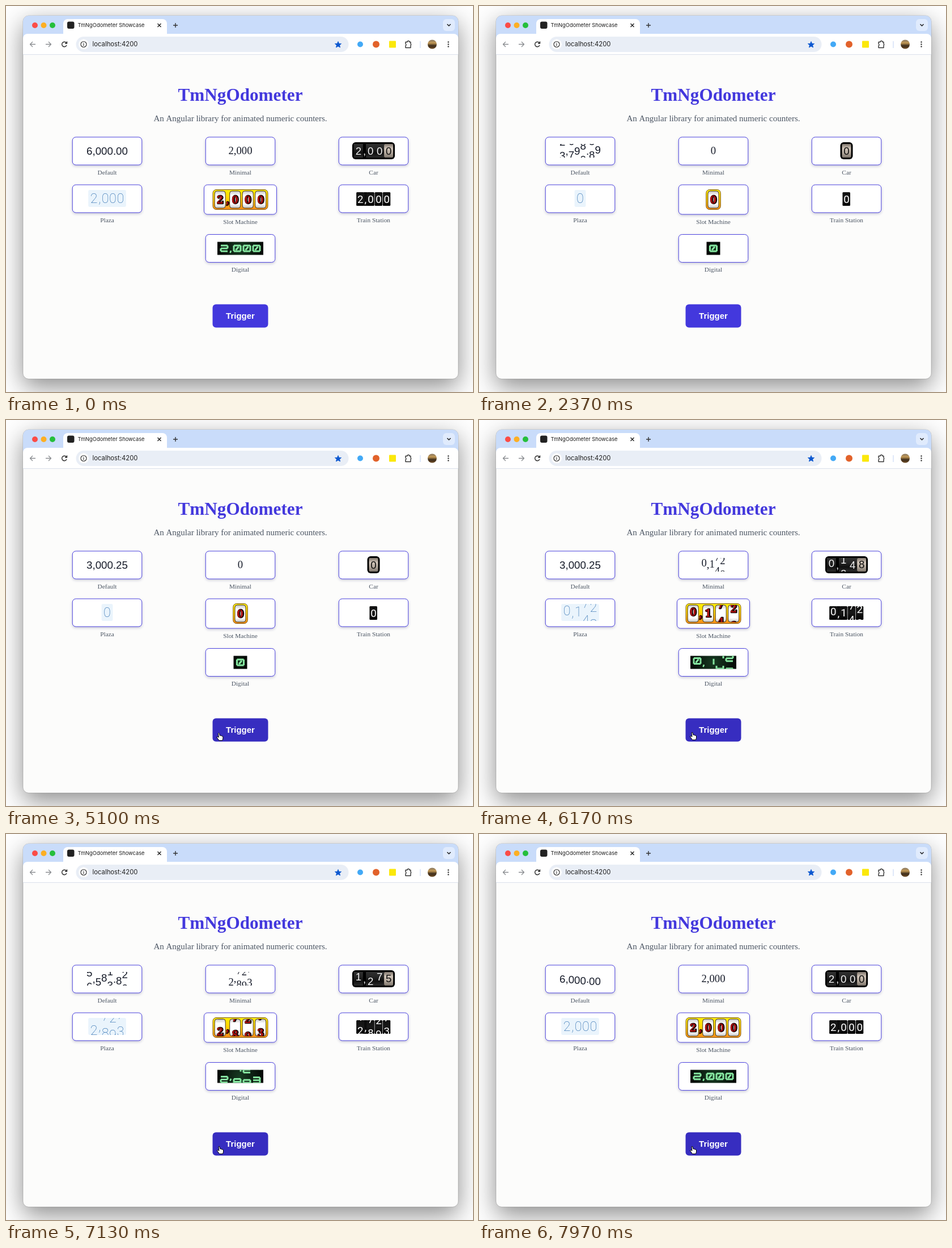
An HTML page with a canvas for the animation above (8000 ms loop, 824 px wide and 680 px high).

```html
<!DOCTYPE html>
<html lang="en">
<head>
<meta charset="utf-8">
<title>TmNgOdometer Showcase</title>
<style>
html, body { margin: 0; width: 100%; height: 100%; overflow: hidden; background: #fff; }
canvas { display: block; width: 824px; height: 680px; }
</style>
</head>
<body>
<canvas id="stage"></canvas>
<script>
const LOOP = 8000, SPIN = 2000, MAX_STEPS = 29;
const RELOAD = 1030, FIRST_SPIN = 1209, CLICK = 6045, SECOND_SPIN = 6180;
const SANS = '"Liberation Sans", Arial, sans-serif';
const SERIF = '"Liberation Serif", "Times New Roman", serif';
const UI = 'Inter, Roboto, sans-serif';
const ACCENT = '#4338dd', DARK = '#1f1f1f';

const canvas = document.getElementById('stage');
const ctx = canvas.getContext('2d');
const ratio = window.devicePixelRatio || 1;
canvas.width = 824 * ratio;
canvas.height = 680 * ratio;

const clamp = (v, lo, hi) => Math.min(hi, Math.max(lo, v));

// ---- drawing helpers ----
function box(x, y, w, h, r, fill, stroke, width = 1) {
  ctx.beginPath();
  ctx.roundRect(x, y, w, h, r);
  if (fill) { ctx.fillStyle = fill; ctx.fill(); }
  if (stroke) { ctx.strokeStyle = stroke; ctx.lineWidth = width; ctx.stroke(); }
}
function disc(x, y, r, fill) {
  ctx.beginPath();
  ctx.arc(x, y, r, 0, 7);
  ctx.fillStyle = fill;
  ctx.fill();
}
function text(str, x, y, font, color, align = 'center') {
  ctx.font = font;
  ctx.fillStyle = color;
  ctx.textAlign = align;
  ctx.fillText(str, x, y);
}
function icon(x, y, d, color, width = 1.4, fill) {
  ctx.save();
  ctx.translate(x, y);
  const path = new Path2D(d);
  if (fill) { ctx.fillStyle = fill; ctx.fill(path); }
  ctx.strokeStyle = color;
  ctx.lineWidth = width;
  ctx.lineJoin = 'round';
  ctx.stroke(path);
  ctx.restore();
}
function withShadow(color, blur, dy, draw) {
  ctx.save();
  ctx.shadowColor = color;
  ctx.shadowBlur = blur * ratio;
  ctx.shadowOffsetY = dy * ratio;
  draw();
  ctx.restore();
}
function fade(y0, y1, ...colors) {
  const g = ctx.createLinearGradient(0, y0, 0, y1);
  colors.forEach((c, i) => g.addColorStop(i / (colors.length - 1), c));
  return g;
}

// ---- timing ----
const clock = t => t + 0.035 * clamp(t - FIRST_SPIN, 0, 1930) + 0.09 * clamp(t - CLICK, 0, 1085);
const progress = (t, start) => clamp((clock(t) - clock(start)) / SPIN, 0, 1);

// cubic-bezier(.25, .1, .25, 1)
function ease(x) {
  if (x <= 0 || x >= 1) return x;
  let lo = 0, hi = 1;
  for (let i = 0; i < 24; i++) {
    const s = (lo + hi) / 2;
    if (0.75 * s * (1 - s) + s ** 3 < x) lo = s; else hi = s;
  }
  return 0.3 * lo * (1 - lo) ** 2 + 3 * lo * lo * (1 - lo) + lo ** 3;
}

// ---- odometer ----
// One ribbon per digit place; long ribbons skip values, lower places run faster.
function ribbons(from, to, decimals) {
  const scale = 10 ** decimals;
  const a = Math.round(from * scale), b = Math.round(to * scale);
  const count = Math.max(String(b).length, decimals + 1);
  let boosted = 0;
  return Array.from({ length: count }, (_, i) => {
    const unit = 10 ** (count - i - 1);
    const start = Math.trunc(a / unit), end = Math.trunc(b / unit), dist = end - start;
    const steps = dist > MAX_STEPS ? MAX_STEPS * (1 + 0.5 * boosted++) : dist;
    const length = Math.ceil(steps);
    const digit = k => (k >= length ? end : Math.round(start + k * dist / steps)) % 10;
    return { length, digit };
  });
}

function markAfter(place, decimals) {
  if (decimals && place === decimals) return '.';
  const whole = place - decimals;
  return whole > 0 && whole % 3 === 0 ? ',' : '';
}

function plainGlyph(char, x, y, theme, last) {
  text(char, x, y + theme.base, theme.font, last && theme.lastInk || theme.ink);
}
function slotGlyph(char, x, y, theme) {
  ctx.font = theme.font;
  ctx.textAlign = 'center';
  ctx.lineJoin = 'round';
  ctx.lineWidth = 2.4;
  ctx.strokeStyle = '#140404';
  ctx.strokeText(char, x + 0.5, y + theme.base);
  text(char, x - 0.4, y + theme.base, theme.font, '#b00d0d');
}
const SEGMENTS = {
  a: 'M-6-5H6', b: 'M6-5V0', c: 'M6 0V5', d: 'M-6 5H6',
  e: 'M-6 0V5', f: 'M-6-5V0', g: 'M-6 0H6', z: 'M-2.5 3L2.5-3'
};
const LIT = ['abcdefz', 'bc', 'abged', 'abgcd', 'fgbc', 'afgcd', 'afgedc', 'abc', 'abcdefg', 'abcdfg'];
function ledGlyph(char, x, y, theme) {
  if (char === ',') icon(x, y + 4, 'M.5 0L-1 4', theme.ink, 2.6);
  else for (const s of LIT[char]) icon(x, y, SEGMENTS[s], theme.ink, 3);
}

const themes = [
  { label: 'Default', x: 178.5, y: 255.5, cy: 255, h: 24, cell: 10.4, mark: 5.2, pad: 0, base: 7,
    font: '18.72px ' + SANS, ink: '#151a28', decimals: 2 },
  { label: 'Minimal', x: 413.5, y: 255.5, cy: 255, h: 24, cell: 9.36, mark: 4.68, pad: 0, base: 6,
    font: '18.72px ' + SERIF, ink: '#151a28' },
  { label: 'Car', x: 648.5, y: 255.5, cy: 255, h: 24, cell: 16, mark: 5.2, pad: 3, base: 7, linear: true,
    font: '18.72px ' + SANS, ink: '#f4f4f4', lastInk: '#0c0c0c',
    frame: (x, w) => box(x, 240, w, 30, 6, '#000'),
    face: (x, last) => box(x, 243, 16, 24, last ? 2 : 0, last
      ? fade(243, 267, '#7d746b', '#d2c6ba', '#b3a89c', '#7d746b')
      : fade(243, 267, '#303030', '#272727', '#101010', '#2c2c2c')) },
  { label: 'Plaza', x: 178.5, y: 339.5, cy: 339, h: 30, cell: 13.35, mark: 6.7, pad: 3.3, base: 8,
    font: '100 23.5px Roboto, sans-serif', ink: '#2f6fb0',
    frame: (x, w) => box(x, 324, w, 30, 3, '#eaf4fc') },
  { label: 'Slot Machine', x: 413.5, y: 341, cy: 341, h: 30, cell: 22.5, mark: 4, pad: 1.5, base: 7, cardH: 52,
    font: '900 20px "Noto Serif", serif', ink: '#b00d0d', glyph: slotGlyph,
    frame: (x, w) => box(x, 323.5, w, 35, 6, fade(323, 359, '#fff200', '#ffd000', '#f78a1c'), '#7a5510'),
    face: x => box(x + 1.7, 326, 19, 30, 4, fade(326, 356, '#c4c4c4', '#fff', '#fff', '#fff', '#c4c4c4'), '#4a3a14') },
  { label: 'Train Station', x: 648.5, y: 339.5, cy: 340, h: 24, cell: 14.2, mark: 4, pad: 0, base: 7,
    font: 'condensed 18.7px Roboto, sans-serif', ink: '#fff',
    frame: (x, w) => w > 20 && box(x + 13, 328, 6, 24, 0, '#0b0b0b'),
    face: x => box(x, 328, 13.6, 24, 1.5, fade(328, 352, '#111', '#181818', '#000')) },
  { label: 'Digital', x: 413.5, y: 427, cy: 427, h: 23, cell: 17, mark: 6, pad: 3.5, base: 6,
    ink: '#86e8a1', glyph: ledGlyph,
    frame: (x, w) => {
      const g = ctx.createRadialGradient(x + w / 2, 427, 0, x + w / 2, 427, w / 2);
      g.addColorStop(0, '#173c22');
      g.addColorStop(1, '#040705');
      box(x, 415.5, w, 23, 0, g);
    } }
];

function reading(theme, t) {
  if (theme.decimals) {
    if (t < RELOAD) return [6000, 6000, 1];
    if (t < FIRST_SPIN) return [0, 0, 1];
    if (t < SECOND_SPIN) return [0, 3000.25, ease(progress(t, FIRST_SPIN))];
    return [3000.25, 6000, ease(progress(t, SECOND_SPIN))];
  }
  if (t < RELOAD) return [2000, 2000, 1];
  if (t < CLICK) return [0, 0, 1];
  const p = progress(t, CLICK);
  return [0, 2000, theme.linear ? p : ease(p)];
}

function drawOdometer(theme, t) {
  const { x: cx, y, cy, h, cell, mark, pad, decimals = 0, cardH = 49, glyph = plainGlyph } = theme;
  const [from, to, p] = reading(theme, t);
  const columns = ribbons(from, to, decimals);
  const marks = columns.map((_, i) => markAfter(columns.length - 1 - i, decimals));
  const width = columns.length * cell + marks.filter(Boolean).length * mark + 2 * pad;
  const cardW = Math.max(122.5, width + 31);

  withShadow('rgba(50,50,110,.3)', 5, 2, () => box(cx - cardW / 2, y - cardH / 2, cardW, cardH, 6, '#fff'));
  box(cx - cardW / 2, y - cardH / 2, cardW, cardH, 6, null, '#4f46e0');
  text(theme.label, cx, y + cardH / 2 + 16.5, '11.3px ' + SERIF, '#4b5563');

  let x = cx - width / 2;
  if (theme.frame) theme.frame(x, width);
  x += pad;
  columns.forEach((column, i) => {
    const last = i === columns.length - 1;
    if (theme.face) theme.face(x, last);
    const pos = column.length * p, k = Math.floor(pos);
    ctx.save();
    ctx.beginPath();
    ctx.rect(x, cy - h / 2, cell, h);
    ctx.clip();
    for (const n of [k, k + 1]) {
      if (n <= column.length) glyph(String(column.digit(n)), x + cell / 2, cy + (n - pos) * h, theme, last);
    }
    ctx.restore();
    x += cell;
    if (marks[i]) {
      glyph(marks[i], x + mark / 2, cy, theme);
      x += mark;
    }
  });
}

// ---- browser window ----
function drawBrowser(t) {
  ctx.fillStyle = '#fff';
  ctx.fillRect(0, 0, 824, 680);
  withShadow('rgba(0,0,0,.45)', 44, 14, () => box(30, 17, 768, 640, 10, '#fcfcfb'));
  box(30, 17, 768, 640, 10, '#fcfcfb', 'rgba(0,0,0,.2)');
  box(30, 17, 768, 40, [10, 10, 0, 0], '#c9dcfa');
  box(30, 49, 768, 36, [8, 8, 0, 0], '#fff');
  box(30, 85, 768, 1, 0, '#dbe1ec');
  ['#fb4c47', '#fdaf24', '#25bf3c'].forEach((c, i) => disc(51 + i * 15.5, 34, 5, c));

  box(101, 23, 183, 28, [8, 8, 0, 0], '#fff');
  box(108, 27.5, 12.5, 12.5, 3, '#222');
  text('TmNgOdometer Showcase', 126.5, 37, '9.3px ' + UI, DARK, 'left');
  icon(270.5, 34, 'M-3-3L3 3M3-3L-3 3', DARK);
  icon(299, 34, 'M-4 0H4M0-4V4', '#333');
  box(771, 23, 21, 21, 6, '#e0ebfd');
  icon(781.5, 33.5, 'M-3-1.5L0 1.5L3-1.5', DARK, 1.5);

  icon(47, 67.5, 'M5 0H-4.5M0-4.5L-4.5 0L0 4.5', '#8a8d91', 1.3);
  icon(75, 67.5, 'M-5 0H4.5M0-4.5L4.5 0L0 4.5', '#8a8d91', 1.3);
  if (t >= 700 && t < 770) icon(103, 67.5, 'M-4-4L4 4M4-4L-4 4', '#333', 1.5);
  else icon(103, 67.5, 'M4 1.5A4.3 4.3 0 1 1 3-3.1L4.3-1.8M4.5-5V-1.5H1', '#333', 1.5);

  box(123.5, 54, 481, 27, 13.5, '#e9eef6');
  disc(137, 67.5, 9, '#fff');
  icon(137, 67.5, 'M5 0A5 5 0 1 1-5 0A5 5 0 1 1 5 0M0-.7V2.8M0-2.8V-1.5', '#333', 1.2);
  text('localhost:4200', 152.5, 71.3, '11.3px ' + UI, DARK, 'left');
  icon(586, 68, 'M0-5.5L1.6-1.8L5.7-1.6L2.6 1.1L3.6 5L0 2.9L-3.6 5L-2.6 1.1L-5.7-1.6L-1.6-1.8Z', '#0b57d0', 0.8, '#0b57d0');
  disc(625, 67.5, 5, '#43a9f6');
  disc(653, 67.5, 6, '#e2622b');
  box(676, 61.5, 12, 12, 1, '#fbe80c');
  icon(710, 67.5, 'M-5-4H-2A2 2 0 0 1 2-4H4V-1A2 2 0 0 1 4 2V6H-5V2.5A2 2 0 0 0-5-1Z', '#333', 1.4);
  box(730.5, 62, 1, 12, 0, '#bfd2f3');
  disc(752, 67.5, 8, fade(60, 75, '#8c7a62', '#c49a55', '#3c2c1b', '#6b4a25'));
  for (const dy of [-4, 0, 4]) disc(780.5, 67.5 + dy, 1.2, '#333');
}

// ---- pointer ----
function pointerAt(t) {
  const left = (1 - clamp((t - 4300) / 1000, 0, 1)) ** 3;
  return [376 - 80 * left, 551 + 140 * left];
}
function drawPointer(x, y, overButton) {
  const hand = 'M-1 0Q0-1.5 1 0L2 4Q3 3 4 4.3Q5 3.6 6 5Q7 4.5 7.5 6L7.5 9Q7 11 6.3 12.5H.5Q-1 10-3.5 7Q-3.5 5.3-1.8 6L0 7Z';
  const arrow = 'M0 0V12L3 9.4L5 13.5L7 12.6L5.2 8.6H8.8Z';
  if (overButton) icon(x, y, hand, '#000', 1, '#fff');
  else icon(x, y, arrow, '#fff', 1, '#000');
}

function draw(t) {
  ctx.setTransform(ratio, 0, 0, ratio, 0, 0);
  drawBrowser(t);
  text('TmNgOdometer', 413.5, 167, 'bold 31.2px ' + SERIF, ACCENT);
  text('An Angular library for animated numeric counters.', 413.5, 203, '15px ' + SERIF, '#4b5563');
  for (const theme of themes) drawOdometer(theme, t);

  const [px, py] = pointerAt(t);
  const visible = t >= 4300;
  const over = visible && px > 365 && py < 566;
  box(364.5, 525.5, 98, 41, 6, over ? '#372dc0' : ACCENT);
  text('Trigger', 413.5, 551, 'bold 15px ' + SANS, '#fff');
  if (visible) drawPointer(px, py, over);
}

const origin = performance.now();
function tick() {
  draw((performance.now() - origin) % LOOP);
  requestAnimationFrame(tick);
}
tick();
</script>
</body>
</html>
```
